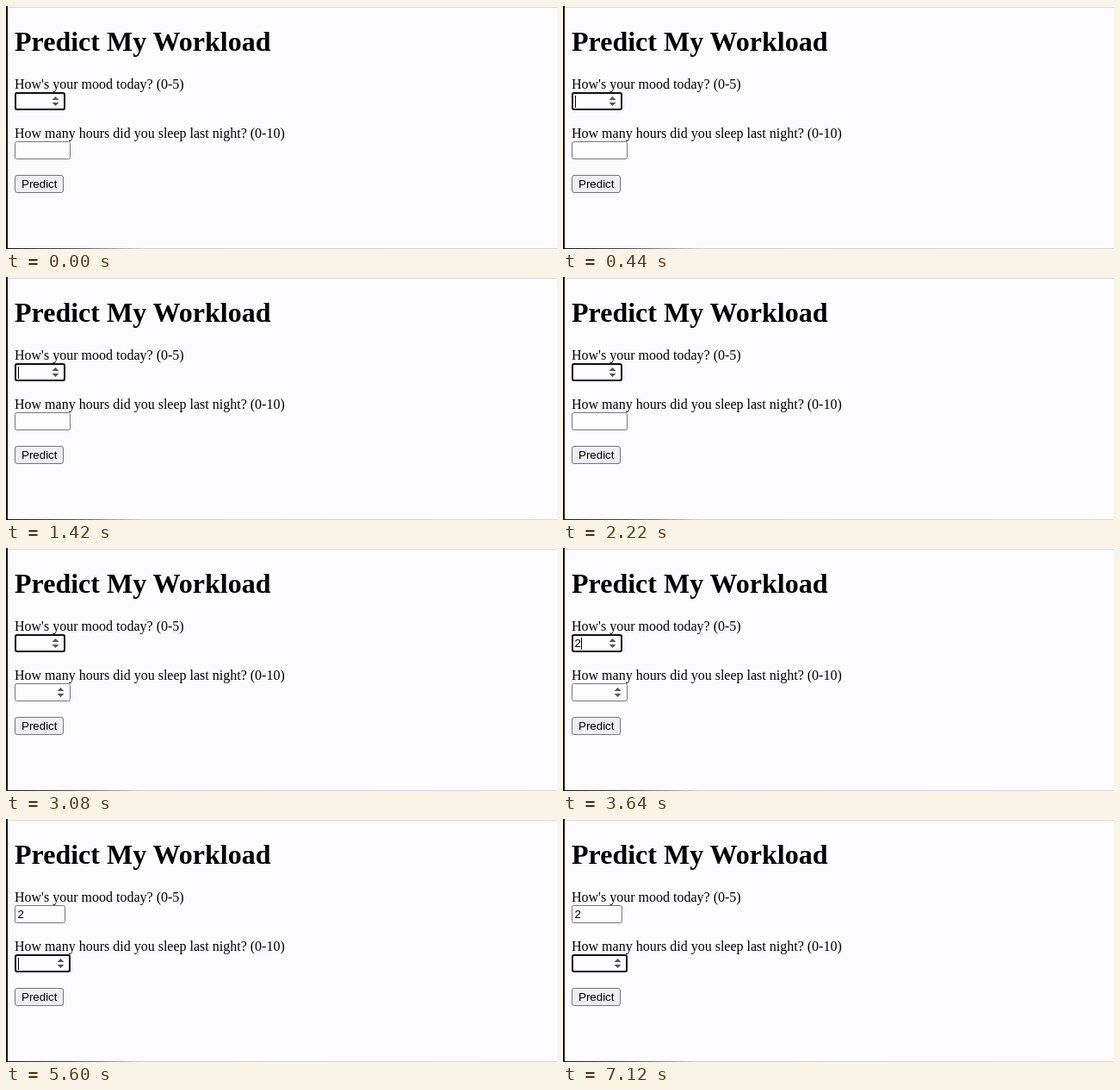
Animation of 640 by 282 pixels, one loop 8000 ms. Source, as an HTML page:

```html
<!DOCTYPE html>
<html lang="en">
<head>
<meta charset="utf-8">
<title>Predict My Workload</title>
<style>
  html, body { margin: 0; width: 100%; height: 100%; overflow: hidden; background: #fcfcff; }
  svg { display: block; width: 640px; height: 282px; }
  text { font: 16px "Liberation Serif", serif; fill: #000; }
  .title { font-size: 32px; font-weight: bold; }
  .control { font: 13.333px "Liberation Sans", sans-serif; }
  .box { fill: #fdfdff; stroke: #767676; }
  .button { fill: #efeff1; }
  .ring { fill: #fdfdff; stroke: #101010; stroke-width: 2; }
  .spin { fill: #555; }
  .caret { fill: #000; shape-rendering: crispEdges; }
</style>
</head>
<body>
<svg viewBox="0 0 640 282">
  <defs>
    <linearGradient id="edge">
      <stop offset="0" stop-color="#1a1012"/>
      <stop offset=".12" stop-color="#554c50"/>
      <stop offset=".25" stop-color="#d0d0d4"/>
      <stop offset="1" stop-color="#d8d8dc"/>
    </linearGradient>
    <path id="arrows" d="M-4 -1.5L0 -5.5L4 -1.5ZM-4 1.5L0 5.5L4 1.5Z"/>
  </defs>
  <rect width="640" height="282" fill="#fcfcff"/>
  <g shape-rendering="crispEdges">
    <rect y="1" width="640" height="1" fill="#d8d8dc"/>
    <rect y="281" width="640" height="1" fill="url(#edge)"/>
    <rect width="2" height="282" fill="#100a0c"/>
  </g>

  <text class="title" x="10" y="52">Predict My Workload</text>
  <text x="10" y="96">How's your mood today? (0-5)</text>
  <text x="10" y="153">How many hours did you sleep last night? (0-10)</text>

  <rect class="box" x="10.5" y="100.5" width="58" height="20" rx="2"/>
  <rect class="ring" id="moodRing" x="11" y="101" width="57" height="19" rx="2"/>
  <use class="spin" id="moodSpin" href="#arrows" x="57.5" y="110.5"/>
  <text class="control" id="moodValue" x="13.5" y="115">2</text>
  <rect class="caret" id="moodCaret" x="14" y="104" width="1" height="14"/>

  <rect class="box" x="10.5" y="157.5" width="64" height="20" rx="2"/>
  <rect class="ring" id="sleepRing" x="11" y="158" width="63" height="19" rx="2"/>
  <use class="spin" id="sleepSpin" href="#arrows" x="63.5" y="167.5"/>
  <rect class="caret" id="sleepCaret" x="14" y="161" width="1" height="14"/>

  <rect class="box button" x="10.5" y="196.5" width="56" height="20" rx="2.5"/>
  <text class="control" x="18" y="211">Predict</text>
</svg>
<script>
  const LOOP = 8000;
  const TYPED = 3220;
  // Visible time spans of each part, in ms.
  const spans = {
    moodRing: [[0, 5600]],
    moodSpin: [[0, 5600]],
    moodCaret: [[440, 980], [1420, 1840], [TYPED, 4460]],
    moodValue: [[TYPED, LOOP]],
    sleepRing: [[5600, LOOP]],
    sleepSpin: [[3080, LOOP]],
    sleepCaret: [[5600, 7120]]
  };
  const byId = id => document.getElementById(id);

  function render(now) {
    const time = now % LOOP;
    for (const [id, times] of Object.entries(spans)) {
      const shown = times.some(([from, to]) => time >= from && time < to);
      byId(id).style.visibility = shown ? "visible" : "hidden";
    }
    byId("moodCaret").setAttribute("x", time < TYPED ? 14 : 21);
  }

  const start = performance.now();
  function tick() {
    render(performance.now() - start);
    requestAnimationFrame(tick);
  }
  tick();
</script>
</body>
</html>
```
